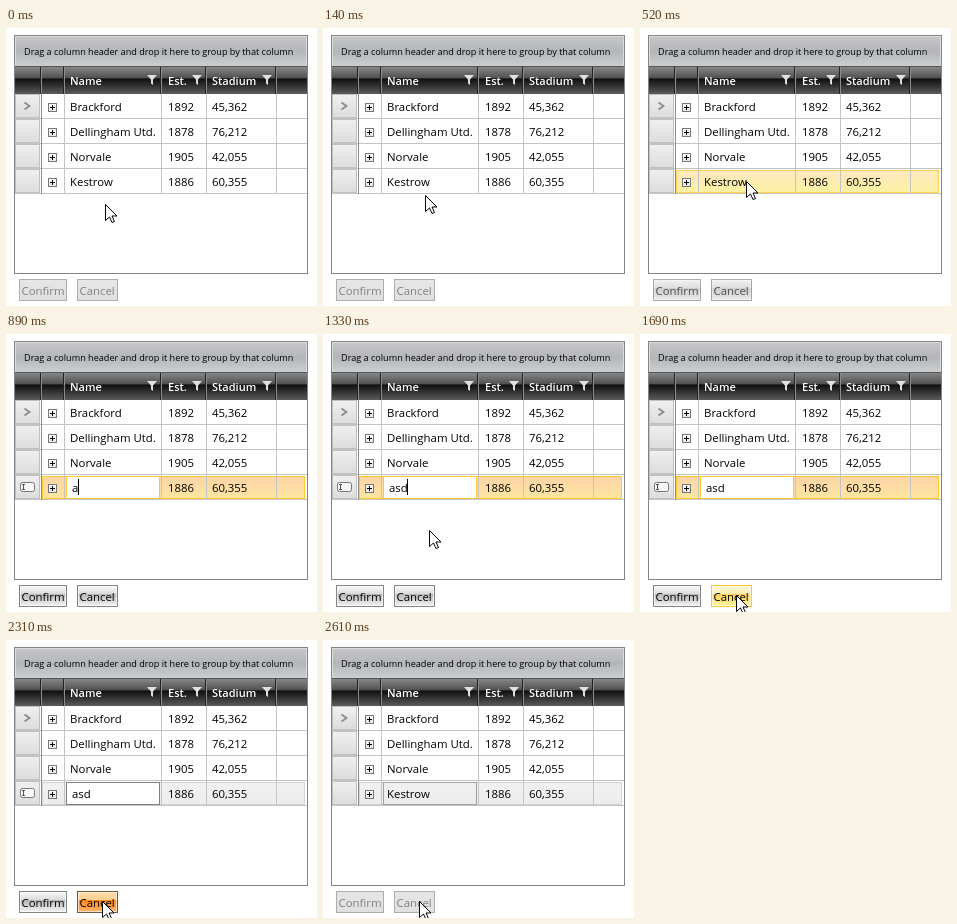
An HTML page with a canvas for the animation above (4.02 s loop, 311 px wide and 278 px high).

```html
<!DOCTYPE html>
<html lang="en">
<head>
<meta charset="utf-8">
<title>Grid row editing</title>
<style>
html, body { margin: 0; width: 100%; height: 100%; overflow: hidden; background: #fff; }
canvas { display: block; }
</style>
</head>
<body>
<canvas id="stage" width="311" height="278"></canvas>
<script>
const g = document.getElementById('stage').getContext('2d', { alpha: false });
const LOOP = 4020;
const FONT = '"Open Sans", "Noto Sans", sans-serif';
const BODY = '11.4px ' + FONT, HEAD = '600 11px ' + FONT, SMALL = '9.1px ' + FONT;

// The picture only changes at these moments (ms).
const TICKS = [0, 60, 140, 200, 280, 360, 520, 580, 890, 1030, 1110, 1170, 1250, 1330,
  1410, 1470, 1550, 1630, 1690, 2150, 2310, 2390, 2450, 2530, 2610];
const PATH = [[0, 99, 176], [360, 106, 153], [1170, 106, 154], [1330, 106, 196],
  [1550, 99, 246], [1690, 96, 261]];
const ROWS = [
  ['Brackford', '1892', '45,362'],
  ['Dellingham Utd.', '1878', '76,212'],
  ['Norvale', '1905', '42,055'],
  ['Kestrow', '1886', '60,355']
];
const COLS = [64, 162, 206];
const LINES = [58, 155, 200, 270];
const HOVER = ['#fffbda', '#fffba3'], SELECTED = ['#fdd3a8', '#fce79f'];

function rect(x, y, w, h, fill) {
  g.fillStyle = fill;
  g.fillRect(x, y, w, h);
}

function frame(x, y, w, h, color) {
  g.strokeStyle = color;
  g.lineWidth = 1;
  g.strokeRect(x + .5, y + .5, w - 1, h - 1);
}

// Vertical gradient; a stop is a colour or [offset, colour].
function shade(y, h, stops) {
  const s = g.createLinearGradient(0, y, 0, y + h);
  stops.forEach((c, i) => Array.isArray(c) ? s.addColorStop(...c) : s.addColorStop(i / (stops.length - 1), c));
  return s;
}

// Top half a-b, bottom half c-d with a hard edge between.
const glossy = (a, b, c, d) => [[0, a], [.42, b], [.43, c], [1, d]];

function box(x, y, w, h, stops, border) {
  rect(x, y, w, h, shade(y, h, stops));
  frame(x, y, w, h, border);
}

function text(s, x, y, font = BODY, color = '#000') {
  g.font = font;
  g.fillStyle = color;
  g.fillText(s, x, y);
}

function line(points, color, width = 1) {
  g.strokeStyle = color;
  g.lineWidth = width;
  g.beginPath();
  points.forEach(p => g.lineTo(...p));
  g.stroke();
}

function fade(alpha, paint) {
  if (alpha <= 0) return;
  g.save();
  g.globalAlpha = alpha;
  paint();
  g.restore();
}

const ramp = (t, a, b) => Math.min(1, Math.max(0, (t - a) / (b - a)));

function pointer(t) {
  const i = PATH.findIndex(k => k[0] > t);
  if (i < 0) return PATH[PATH.length - 1].slice(1);
  const [a, b] = [PATH[i - 1], PATH[i]], k = ramp(t, a[0], b[0]);
  return [1, 2].map(n => Math.round(a[n] + (b[n] - a[n]) * k));
}

function funnel(x) {
  g.fillStyle = '#e0e0e0';
  g.beginPath();
  [[0, 47], [10, 47], [6, 51.5], [6, 57], [4, 55.5], [4, 51.5]].forEach(([dx, y]) => g.lineTo(x + dx, y));
  g.fill();
}

function expander(y) {
  box(42, y, 9, 9, ['#fff', '#e4e4e4'], '#777');
  rect(44, y + 4, 5, 1, '#000');
  rect(46, y + 2, 1, 5, '#000');
}

function drawHeader() {
  box(9, 8, 292, 31, ['#c6c6c8', '#b4b6b9', '#cdd0d3'], '#dcdcdc');
  text('Drag a column header and drop it here to group by that column', 18, 27, SMALL);
  rect(9, 39, 292, 27, shade(39, 27, glossy('#868686', '#4f4f4f', '#0e0e0e', '#5b5b5b')));
  rect(9, 38, 292, 1, '#555');
  [35, ...LINES].forEach(x => {
    rect(x - 1, 39, 1, 27, '#222');
    rect(x, 39, 1, 27, '#8c8c8c');
  });
  ['Name', 'Est.', 'Stadium'].forEach((s, i) => text(s, COLS[i], 57, HEAD, '#fff'));
  [141, 186, 256].forEach(funnel);
}

function drawRow(i, t) {
  const y = 66 + i * 25, last = i === 3;
  const editing = last && t >= 580 && t < 2390;
  const grey = last && t >= 2310;
  const band = (stops, border) => box(36, y + 1, 263, 23, stops, border);
  rect(9, y, 292, 24, '#fff');
  rect(9, y + 24, 292, 1, '#c4c4c4');

  if (grey) band(['#f1f1f1', '#ececec'], '#d4d4d4');
  else if (last) {
    fade(ramp(t, 140, 280), () => band(HOVER, '#ffd65c'));
    fade(ramp(t, 460, 580), () => band(SELECTED, '#ffc92b'));
  }

  box(9, y, 25, 24, ['#f0f0f0', '#dcdcdc'], '#c0c0c0');
  rect(35, y, 1, 25, '#8c8c8c');
  LINES.forEach(x => rect(x, y, 1, 25, '#c4c4c4'));
  expander(y + 9);

  if (i === 0) line([[18.5, 74.5], [23.5, 78], [18.5, 81.5]], '#8c8c8c', 1.8);
  if (editing) {
    g.fillStyle = '#f8f8f8';
    g.strokeStyle = '#777';
    g.lineWidth = 1;
    g.beginPath();
    g.roundRect(14.5, 148.5, 14, 9, 2);
    g.fill();
    g.stroke();
    line([[16, 150.5], [19, 150.5], [17.5, 150.5], [17.5, 155.5], [16, 155.5], [19, 155.5]], '#555');
  }
  if (editing) box(60, 142, 94, 23, ['#fff', '#fff'], grey ? '#808080' : '#ffc92b');
  else if (grey) frame(60, 142, 94, 23, '#a0a0a0');

  const value = editing && t >= 890 ? 'asd'.slice(0, t < 1030 ? 1 : t < 1110 ? 2 : 3) : ROWS[i][0];
  const left = editing ? 66 : COLS[0];
  g.font = BODY;
  const width = g.measureText(value).width;
  if (editing && t < 890) rect(66, 145, width, 17, '#add6ff');
  text(value, left, y + 17);
  if (editing && (t >= 890 && t < 1630 || t >= 2150 && t < 2310))
    rect(Math.floor(left + width), 145, 1, 16, '#000');
  ROWS[i].slice(1).forEach((s, n) => text(s, COLS[n + 1], y + 17));
}

function button(label, x, w, textX, t) {
  const on = ramp(t, 460, 580) * (1 - ramp(t, 2310, 2610));
  const face = (stops, border) => {
    box(x, 251, w, 22, stops, border);
    frame(x + 1, 252, w - 2, 20, 'rgba(255,255,255,.6)');
  };
  box(x, 251, w, 22, ['#e6e6e6', '#e0e0e0'], '#adadad');
  fade(on, () => face(glossy('#fff', '#d8d8d8', '#b8b8b8', '#f8f8f8'), '#848484'));
  if (label === 'Cancel') {
    if (t < 2310) fade(ramp(t, 1550, 1690), () => face(glossy('#fffbda', '#feebae', '#ffd25a', '#fffba3'), '#ffc92b'));
    else fade(on, () => face(glossy('#ffdcab', '#ffd18f', '#fe881d', '#ffba74'), '#6b5a42'));
  }
  fade(1 - on, () => text(label, textX, 267, BODY, '#808080'));
  fade(on, () => text(label, textX, 267));
}

function drawPointer(t) {
  if (t >= 890 && t < 1170) return;
  const [x, y] = pointer(t);
  if (t >= 580 && t < 1250) {
    rect(x + 1, 146, 1, 16, '#000');
    [146, 161].forEach(yy => rect(x - 1, yy, 5, 1, '#000'));
    return;
  }
  g.beginPath();
  [[0, 0], [0, 16], [4, 12.5], [6.5, 18], [9, 17], [6.5, 11.5], [11.5, 11.5]]
    .forEach(([dx, dy]) => g.lineTo(x + dx + .5, y + dy + .5));
  g.closePath();
  g.fillStyle = '#fff';
  g.fill();
  g.strokeStyle = '#000';
  g.lineWidth = 1;
  g.stroke();
}

function draw(t) {
  rect(0, 0, 311, 278, '#fff');
  drawHeader();
  ROWS.forEach((_, i) => drawRow(i, t));
  frame(8, 7, 294, 239, '#848484');
  button('Confirm', 13, 48, 15.5, t);
  button('Cancel', 71, 41, 73.5, t);
  drawPointer(t);
}

let start;
function tick(now) {
  start ??= now;
  const t = (now - start) % LOOP;
  draw(TICKS.filter(k => k <= t).pop() ?? 0);
  requestAnimationFrame(tick);
}
draw(0);
requestAnimationFrame(tick);
</script>
</body>
</html>
```
